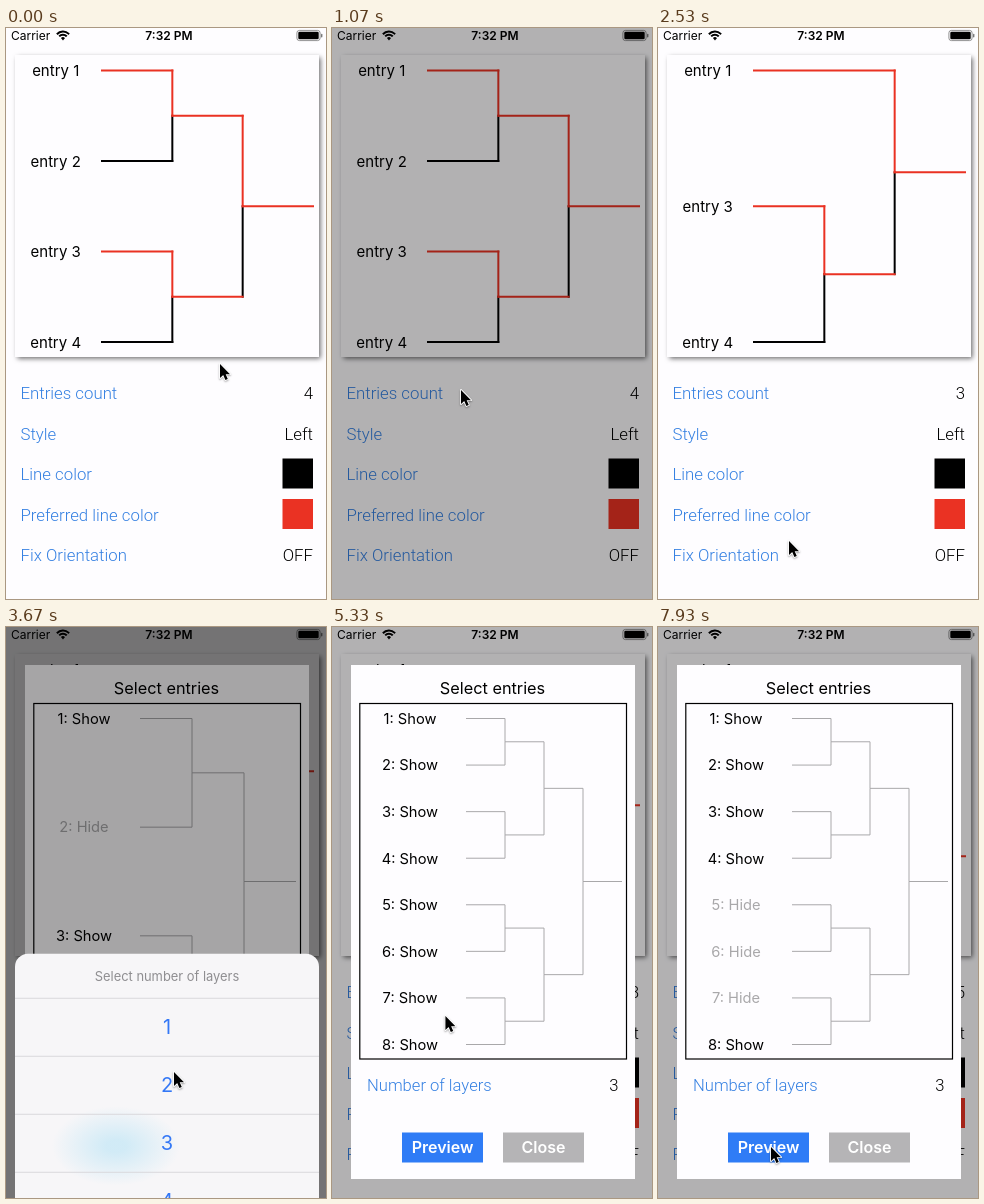
An HTML page with a canvas for the animation above (8 s loop, 320x571 px).

```html
<!DOCTYPE html>
<html lang="en">
<head>
<meta charset="utf-8">
<title>Tournament bracket</title>
<style>
  html, body { margin: 0; width: 100%; height: 100%; overflow: hidden; background: #fefdff; }
  canvas { display: block; width: 320px; height: 571px; }
</style>
</head>
<body>
<canvas id="stage"></canvas>
<script>
const W = 320, H = 571, LOOP = 8000;
const canvas = document.getElementById('stage');
const ctx = canvas.getContext('2d');
const dpr = window.devicePixelRatio || 1;
canvas.width = W * dpr;
canvas.height = H * dpr;

const PAPER = '#fefdff', RED = '#ea3223', BLUE = '#3478f6', LABEL = '#3580e2', GREY = '#a9a8aa';
const SANS = 'Inter, "Noto Sans", sans-serif';
const LIGHT = 'Roboto, "Liberation Sans", sans-serif';

// Times of taps and of what they change
const OPEN = 930, HIDE2 = 1620, SHEET_UP = 3540, SHEET_DOWN = 4260, LAYERS3 = 4660;
const HIDE7 = 5700, HIDE6 = 6530, HIDE5 = 6870;
const PREVIEWS = [[2230, 2620], [7250, 7590]];

// Pointer stops: time, x, y
const PATH = [
  [0, 214, 336], [70, 214, 336], [800, 129, 362], [1080, 129, 362], [1530, 84, 199],
  [1680, 84, 199], [2150, 131, 513], [2850, 131, 513], [3420, 160, 452], [3550, 160, 452],
  [3670, 168, 445], [4050, 200, 406], [4270, 200, 406], [4470, 212, 461], [4800, 212, 461],
  [5560, 86, 369], [5850, 86, 369], [6250, 89, 321], [6560, 89, 321], [6730, 87, 276],
  [7010, 87, 276], [7210, 113, 520], [8000, 113, 520]
];

const clamp = v => Math.max(0, Math.min(1, v));
const ramp = (t, from, ms) => clamp((t - from) / ms);
const smooth = p => p * p * (3 - 2 * p);
const easeOut = p => 1 - (1 - p) ** 3;

function text(str, x, y, { size = 15, weight = 400, color = '#000', align = 'left', family = SANS } = {}) {
  ctx.font = `${weight} ${size}px ${family}`;
  ctx.fillStyle = color;
  ctx.textAlign = align;
  ctx.fillText(str, x, y + size * 0.36);
}

function box(x, y, w, h, color) {
  ctx.fillStyle = color;
  ctx.fillRect(x, y, w, h);
}

function line(x1, y1, x2, y2, color, width) {
  ctx.strokeStyle = color;
  ctx.lineWidth = width;
  ctx.beginPath();
  ctx.moveTo(x1, y1);
  ctx.lineTo(x2, y2);
  ctx.stroke();
}

function roundBox(x, y, w, h, r, color) {
  ctx.fillStyle = color;
  ctx.beginPath();
  ctx.roundRect(x, y, w, h, r);
  ctx.fill();
}

function dim(alpha) {
  if (alpha > 0) box(0, 0, W, H, `rgba(0,0,0,${alpha})`);
}

// Draws a knockout tree of the given slots; empty branches let the other side pass
function bracket({ layers, slots, top, bottom, left, right, width, upper, lower }) {
  const col = (right - left) / (layers + 1);
  const gap = (bottom - top) / (slots.length - 1);
  const strokes = [];
  const add = (color, ...pts) => strokes.push({ color, pts });

  function build(first, level) {
    if (level === 0) {
      const i = slots.indexOf(first);
      return i < 0 ? null : { y: top + i * gap, x: left, leaf: true };
    }
    const a = build(first, level - 1);
    const b = build(first + 2 ** (level - 1), level - 1);
    if (!a || !b) return a || b;
    const x = left + level * col, y = (a.y + b.y) / 2;
    add(upper, a.x, a.y, x, a.y);
    add(upper, x, a.y, x, y);
    add(b.leaf ? lower : upper, b.x, b.y, x, b.y);
    add(lower, x, y, x, b.y);
    return { x, y };
  }

  const root = build(1, layers);
  add(upper, root.x, root.y, right, root.y);
  ctx.lineCap = width > 1 ? 'square' : 'butt';
  for (const color of new Set([lower, upper]))
    for (const s of strokes) if (s.color === color) line(...s.pts, color, width);
  ctx.lineCap = 'butt';
  return i => top + i * gap;
}

function statusBar() {
  text('Carrier', 5, 7.7, { size: 12 });
  text('7:32 PM', 163, 7.7, { size: 12, weight: 600, align: 'center' });

  ctx.strokeStyle = '#000';
  ctx.lineWidth = 2;
  for (const r of [5.2, 8.4]) {
    ctx.beginPath();
    ctx.arc(57, 12, r, -Math.PI * 0.76, -Math.PI * 0.24);
    ctx.stroke();
  }
  ctx.fillStyle = '#000';
  ctx.beginPath();
  ctx.moveTo(57, 12.5);
  ctx.arc(57, 12, 2.8, -Math.PI * 0.76, -Math.PI * 0.24);
  ctx.fill();

  ctx.strokeStyle = '#777';
  ctx.lineWidth = 0.8;
  ctx.beginPath();
  ctx.roundRect(290.9, 2.4, 23.2, 10.2, 2.5);
  ctx.stroke();
  roundBox(292.3, 3.8, 20.4, 7.4, 1.3, '#000');
  roundBox(315, 5.8, 1.4, 3.6, 0.7, '#777');
}

function mainScreen(layers, shown) {
  box(0, 0, W, H, PAPER);
  statusBar();

  ctx.save();
  ctx.shadowColor = 'rgba(0,0,0,.6)';
  ctx.shadowBlur = 5 * dpr;
  ctx.shadowOffsetX = ctx.shadowOffsetY = 1.5 * dpr;
  box(9, 27, 304, 302, PAPER);
  ctx.restore();

  const yOf = bracket({
    layers, slots: shown, top: 42.5, bottom: 314, left: 96, right: 307,
    width: 2, upper: RED, lower: '#000'
  });
  shown.forEach((n, i) => text('entry ' + n, 49.7, yOf(i) + 0.3, { size: 15, align: 'center' }));

  const rows = ['Entries count', 'Style', 'Line color', 'Preferred line color', 'Fix Orientation'];
  const values = [String(shown.length), 'Left', '', '', 'OFF'];
  rows.forEach((name, i) => {
    const y = 365 + i * 40.5, font = { size: 16.8, weight: 300, family: LIGHT };
    text(name, 14.5, y, { ...font, color: LABEL });
    text(values[i], 307, y, { ...font, align: 'right' });
  });
  box(276.5, 430.5, 30.5, 30, '#000');
  box(276.5, 471, 30.5, 30, RED);
}

function button(label, x, color) {
  box(x, 505.5, 81, 30, color);
  text(label, x + 40.5, 520.5, { size: 16, weight: 600, color: '#fff', align: 'center' });
}

function dialog(layers, shown, alpha) {
  if (alpha <= 0) return;
  ctx.save();
  ctx.globalAlpha = alpha;
  box(19, 38, 284, 514, PAPER);
  text('Select entries', 160.5, 61, { size: 16.3, align: 'center' });
  ctx.strokeStyle = '#000';
  ctx.lineWidth = 1.2;
  ctx.strokeRect(27.8, 76.5, 266.7, 355.5);

  const slots = Array.from({ length: 2 ** layers }, (_, i) => i + 1);
  const yOf = bracket({
    layers, slots, top: 91.5, bottom: 417.5, left: 134, right: 290,
    width: 1, upper: GREY, lower: GREY
  });
  slots.forEach((n, i) => {
    const on = shown.includes(n);
    text(`${n}: ${on ? 'Show' : 'Hide'}`, 78, yOf(i), {
      size: 14.7, align: 'center', color: on ? '#000' : GREY
    });
  });

  const font = { size: 16.6, weight: 300, family: LIGHT };
  text('Number of layers', 35, 458, { ...font, color: LABEL });
  text(String(layers), 286.5, 458, { ...font, align: 'right' });
  button('Preview', 70, '#2f7cf6');
  button('Close', 171, '#b5b4b6');
  ctx.restore();
}

function sheet(p) {
  if (p <= 0) return;
  dim(Math.min(0.4, p * 0.5));
  const top = H - 351 * p, x = 9, w = 304;
  roundBox(x, top, w, 276, 13, '#f7f6f8');

  // Blue button glowing through the frosted panel
  ctx.save();
  ctx.clip();
  ctx.translate(110, 519);
  ctx.scale(1, 0.62);
  const glow = ctx.createRadialGradient(0, 0, 10, 0, 0, 64);
  glow.addColorStop(0, 'rgba(200,232,246,.8)');
  glow.addColorStop(1, 'rgba(200,232,246,0)');
  box(-64, -64, 128, 128, glow);
  ctx.restore();

  text('Select number of layers', 161, top + 22.5, { size: 12.9, color: '#8f8e91', align: 'center' });
  for (let i = 0; i < 4; i++) {
    const y = top + 44 + i * 58;
    line(x, y + 0.5, x + w, y + 0.5, '#d9d8dc', 1);
    text(String(i + 1), 161, y + 29, { size: 20, color: BLUE, align: 'center' });
  }
  roundBox(x, top + 284, w, 57, 13, '#fff');
  text('Cancel', 161, top + 312.5, { size: 20, weight: 600, color: BLUE, align: 'center' });
}

function pointer(t) {
  const i = Math.max(1, PATH.findIndex(s => s[0] > t));
  const [t0, x0, y0] = PATH[i - 1], [t1, x1, y1] = PATH[i];
  const p = smooth(ramp(t, t0, t1 - t0));
  ctx.save();
  ctx.translate(x0 + (x1 - x0) * p, y0 + (y1 - y0) * p);
  ctx.beginPath();
  [[0, 0], [0, 14], [3.2, 11.1], [5.4, 16], [7.8, 15], [5.7, 10.2], [10, 10.2]]
    .forEach(([x, y]) => ctx.lineTo(x, y));
  ctx.closePath();
  ctx.shadowColor = 'rgba(0,0,0,.35)';
  ctx.shadowBlur = 2 * dpr;
  ctx.shadowOffsetY = dpr;
  ctx.lineJoin = 'round';
  ctx.lineWidth = 1.8;
  ctx.strokeStyle = '#fff';
  ctx.stroke();
  ctx.shadowColor = 'transparent';
  ctx.fillStyle = '#000';
  ctx.fill();
  ctx.restore();
}

function draw(t) {
  const layers = t < LAYERS3 ? 2 : 3;
  const hideAt = layers === 2 ? { 2: HIDE2 } : { 5: HIDE5, 6: HIDE6, 7: HIDE7 };
  const shown = [];
  for (let n = 1; n <= 2 ** layers; n++) if (!(t >= hideAt[n])) shown.push(n);

  let open = 1;
  for (const [from, to] of PREVIEWS) open += ramp(t, to, 200) - ramp(t, from, 180);

  ctx.setTransform(dpr, 0, 0, dpr, 0, 0);
  mainScreen(layers, shown);
  dim(0.3 * open * ramp(t, OPEN, 130));
  dialog(layers, shown, open * ramp(t, OPEN + 150, 220));
  sheet(easeOut(ramp(t, SHEET_UP, 400)) - easeOut(ramp(t, SHEET_DOWN, 400)));
  pointer(t);
}

function tick() {
  draw(performance.now() % LOOP);
  requestAnimationFrame(tick);
}
tick();
</script>
</body>
</html>
```
